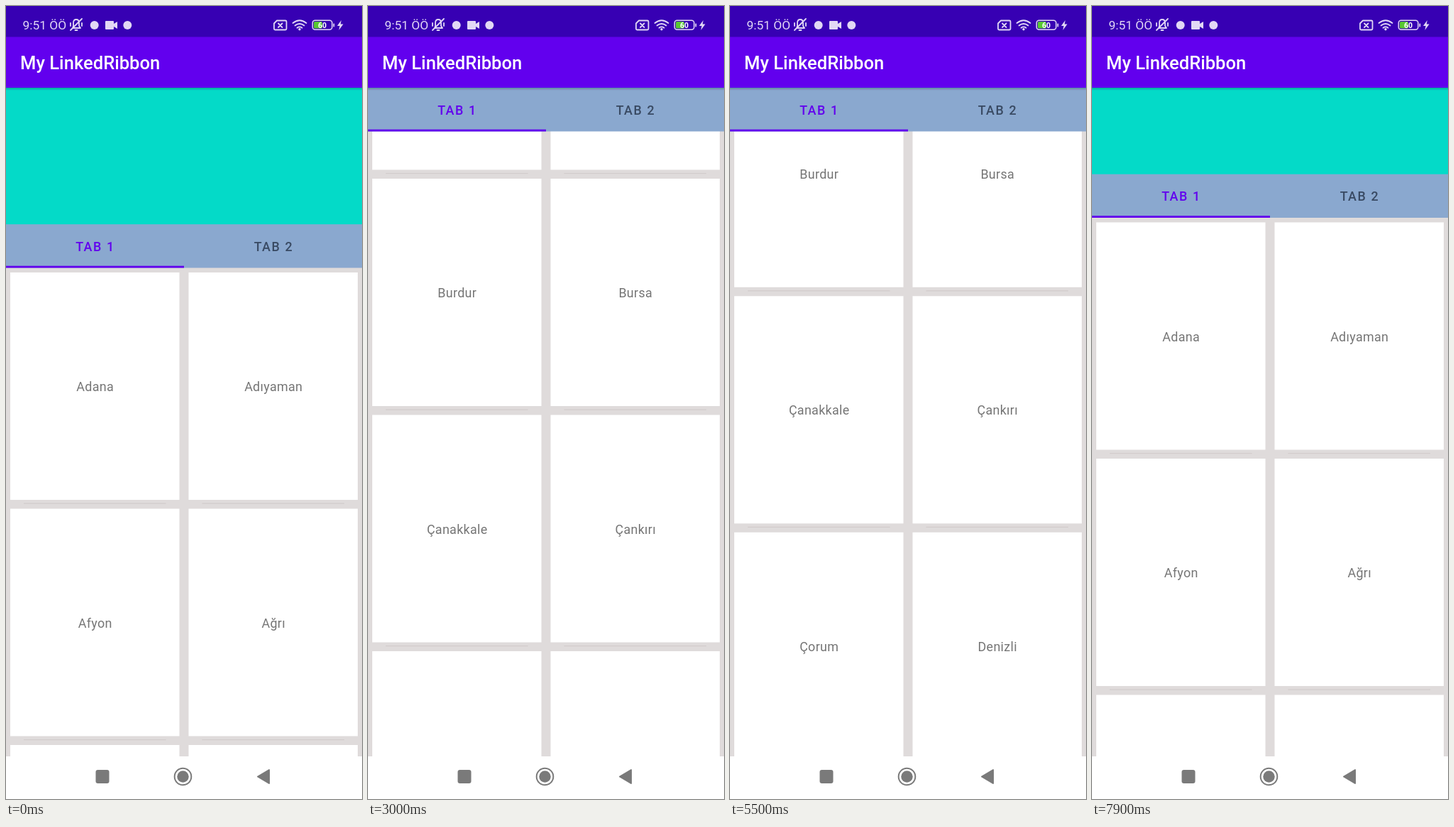
Write an HTML page that moves like this. It is 502 by 1116 pixels and loops after 8000 ms.

```html
<!DOCTYPE html>
<html lang="tr">
<head>
<meta charset="utf-8">
<style>
  html, body { margin: 0; width: 100%; height: 100%; overflow: hidden; background: #fff; }
  svg { display: block; width: 100vw; height: 100vh; }
  text { font-family: Roboto, sans-serif; }
  .city { font-size: 17.9px; letter-spacing: .32px; fill: #757575; text-anchor: middle; }
  .tab { font-size: 17.9px; font-weight: 500; letter-spacing: 1.6px; text-anchor: middle; }
  .line { fill: none; stroke: #e2d8f5; stroke-width: 1.8; stroke-linecap: round; stroke-linejoin: round; }
  .solid { fill: #e2d8f5; }
</style>
</head>
<body>
<svg viewBox="0 0 502 1116">
  <defs>
    <clipPath id="view"><rect width="502" height="1056"/></clipPath>
    <linearGradient id="shade" x2="0" y2="1">
      <stop offset="0" stop-opacity=".22"/>
      <stop offset="1" stop-opacity="0"/>
    </linearGradient>
  </defs>
  <rect width="502" height="1116" fill="#fff"/>

  <g clip-path="url(#view)">
    <g id="pager">
      <rect y="115" width="502" height="941" fill="#dfdbdb"/>
      <g id="list"></g>
      <rect x="502" y="115" width="502" height="941" fill="#20498b"/>
    </g>
    <rect id="banner" y="115" width="502" height="193" fill="#04dac8"/>
    <g id="tabs">
      <rect width="502" height="61.3" fill="#8aa8cf"/>
      <text id="tab1" class="tab" x="126" y="37.6">TAB 1</text>
      <text id="tab2" class="tab" x="377.5" y="37.6">TAB 2</text>
      <rect id="mark" y="58.5" width="251" height="2.8" fill="#6200ee"/>
    </g>
  </g>

  <rect y="115" width="502" height="4" fill="url(#shade)"/>
  <rect y="43" width="502" height="72" fill="#6200ee"/>
  <rect width="502" height="43.5" fill="#3700b3"/>
  <text x="20" y="89" font-size="25.6" font-weight="500" fill="#fff">My LinkedRibbon</text>

  <g id="status">
    <text class="solid" x="23.5" y="33" font-size="17.4">9:51 ÖÖ</text>
    <path class="line" d="M94 31H105L103 28V24Q103 19 99 19Q95 19 95 24V28ZM97.5 34H100.5M91 34L107 18M91 24V28M107 24V28"/>
    <circle class="solid" cx="124.7" cy="27" r="6"/>
    <path class="solid" d="M141 21H151Q152 21 152 22V25L157 22V32L152 29V32Q152 33 151 33H141Q140 33 140 32V22Q140 21 141 21Z"/>
    <circle class="solid" cx="171.3" cy="27" r="6"/>
    <path class="line" d="M382 20.5H394Q395.5 20.5 395.5 22V32Q395.5 33.5 394 33.5H379.5Q378 33.5 378 32V24.5ZM384 24.5L389.5 30M389.5 24.5L384 30"/>
    <path class="line" stroke-width="2.2" d="M404.5 24Q414 16.5 423.5 24M407.5 27.5Q414 22.5 420.5 27.5M410.5 30.7Q414 28.2 417.5 30.7"/>
    <circle class="solid" cx="414" cy="32.8" r="1.7"/>
    <rect x="434" y="22" width="12" height="9.6" rx="1.5" fill="#58c832"/>
    <rect class="line" x="432.3" y="20.3" width="27.5" height="13" rx="3.5" style="stroke-width:1.5"/>
    <text x="446" y="30.6" font-size="10.5" font-weight="700" fill="#fff" text-anchor="middle">60</text>
    <path class="line" d="M462.3 25.5V28.5"/>
    <path class="solid" d="M472.8 20L467 28H470.6L469.4 34L475.6 25.6H471.8Z"/>
  </g>

  <g fill="#7a7a7a">
    <rect x="126.5" y="1075" width="19" height="19" rx="3"/>
    <circle cx="249.5" cy="1084.5" r="11.8" fill="none" stroke="#7a7a7a" stroke-width="2"/>
    <circle cx="249.5" cy="1084.5" r="8.2"/>
    <path d="M355 1084.5L371 1075V1094Z" stroke="#7a7a7a" stroke-width="2" stroke-linejoin="round"/>
  </g>
</svg>
<script>
const LOOP = 8000, STEP = 100, PITCH = 332.5, BANNER = 192;
const CITIES = ("Adana Adıyaman Afyon Ağrı Amasya Ankara Antalya Artvin Aydın Balıkesir " +
  "Bilecik Bingöl Bitlis Bolu Burdur Bursa Çanakkale Çankırı Çorum Denizli " +
  "Diyarbakır Edirne Elazığ Erzincan").split(" ");

// [time, value] knots
const SCROLL = [[0, 0], [400, 0], [900, 190], [1300, 480], [1700, 760], [2300, 1600],
  [3000, 2459.5], [3500, 2668], [5450, 2668], [5900, 1000], [6250, 0],
  [6800, 0], [7200, 19], [7900, 70.5]];
const PAGE = [[3600, 0], [4000, .251], [4300, .8], [4550, 1], [4850, 1],
  [5000, .946], [5250, .3], [5450, 0]];

const $ = id => document.getElementById(id);
const move = (el, x, y) => el.setAttribute("transform", `translate(${x} ${y})`);

$("list").innerHTML = CITIES.map((name, i) => {
  const x = i % 2 ? 257.5 : 6, y = (i >> 1) * PITCH;
  return `<rect x="${x}" y="${y}" width="238.5" height="320" fill="#fff"/>
    <rect x="${x + 19}" y="${y + 324.5}" width="200.5" height="1.2" fill="#d2cccc"/>
    <text class="city" x="${x + 119.7}" y="${y + 167}">${name}</text>`;
}).join("");

const rate = (k, i) => (k[i + 1][1] - k[i][1]) / (k[i + 1][0] - k[i][0]);

function slope(k, i) {
  if (i === 0 || i === k.length - 1) return 0;
  const a = rate(k, i - 1), b = rate(k, i);
  return a * b > 0 ? 2 * a * b / (a + b) : 0;
}

// Monotone cubic curve through the knots
function sample(k, t) {
  if (t <= k[0][0]) return k[0][1];
  const i = k.findIndex(p => p[0] > t) - 1;
  if (i < 0) return k[k.length - 1][1];
  const [t0, a] = k[i], [t1, b] = k[i + 1];
  const d = t1 - t0, u = (t - t0) / d, v = 1 - u;
  return a * v * v * (1 + 2 * u) + b * u * u * (3 - 2 * u)
    + d * u * v * (slope(k, i) * v - slope(k, i + 1) * u);
}

function draw(t) {
  const scroll = sample(SCROLL, t), page = sample(PAGE, t);
  const rise = Math.min(scroll, BANNER);
  move($("list"), 0, 375 - scroll);
  move($("pager"), -502 * page, 0);
  move($("banner"), 0, -rise);
  move($("tabs"), 0, 307.2 - rise);
  $("mark").setAttribute("x", 251 * page);
  $("tab1").setAttribute("fill", page < .5 ? "#6200ee" : "#394a63");
  $("tab2").setAttribute("fill", page < .5 ? "#394a63" : "#6200ee");
}

function tick() {
  const t = performance.now() % LOOP;
  draw(Math.floor(t / STEP) * STEP);
  requestAnimationFrame(tick);
}
tick();
</script>
</body>
</html>
```
